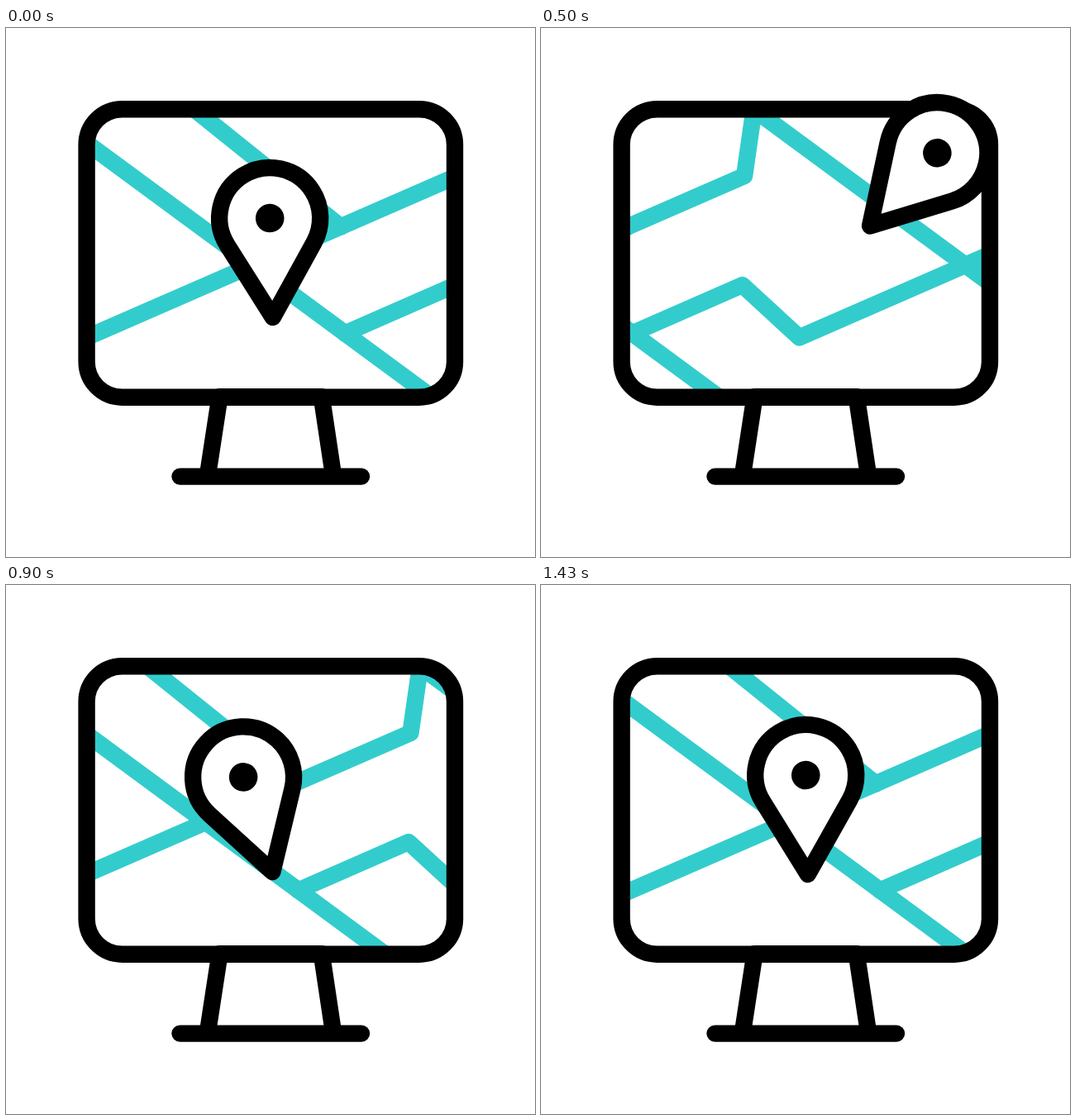
An HTML page with a canvas for the animation above (1670 ms loop, 640 by 640 pixels).

```html
<!DOCTYPE html>
<html lang="en">
<head>
<meta charset="utf-8">
<title>Map on a monitor</title>
<style>
  html, body { margin: 0; width: 100%; height: 100%; overflow: hidden; background: #fff; }
  canvas { display: block; width: 640px; height: 640px; }
</style>
</head>
<body>
<canvas id="stage" width="640" height="640"></canvas>
<script>
const ctx = document.getElementById('stage').getContext('2d');
const LOOP = 1670, STEP = 100 / 3;
const INK = '#000', ROAD = '#33cccc', PAPER = '#fff';
const TILE = 515;
const HOME = [322.8, 350], LEFT = [194, 339.5], RIGHT = [405, 236], BEND = [310, 275.7];

// Smooth 0 to 1 between two steps.
function ease(step, from, to) {
  const u = Math.min(1, Math.max(0, (step - from) / (to - from)));
  return u * u * (3 - 2 * u);
}

const mix = (a, b, u) => a.map((v, i) => v + (b[i] - v) * u);

// One tile of travel, with a slight lead early on.
function mapOffset(step) {
  return TILE * ease(step, 0, 34) + 9 * (ease(step, 0, 7) - ease(step, 10, 18));
}

// The tip darts left, sweeps right, then curves back home.
function pinTip(step) {
  const out = mix(mix(HOME, LEFT, ease(step, 0, 6.8)), RIGHT, ease(step, 6.8, 16));
  const back = ease(step, 16, 28);
  return mix(mix(out, BEND, back), mix(BEND, HOME, back), back);
}

// The head leads the tip, overshoots and settles.
function pinTilt(step) {
  return 1.2 + 25.8 * ease(step, -0.7, 7.7) - 75.5 * ease(step, 7.7, 16.5)
       + 73.6 * ease(step, 16.5, 24.5) - 31 * ease(step, 24.5, 32) + 7.1 * ease(step, 32, 43);
}

function line(...points) {
  ctx.beginPath();
  points.forEach(([x, y]) => ctx.lineTo(x, y));
  ctx.stroke();
}

function screenPath() {
  ctx.beginPath();
  ctx.roundRect(97.6, 98.2, 445.4, 348.5, 43);
}

function drawMap(offset) {
  ctx.save();
  screenPath();
  ctx.clip();
  ctx.strokeStyle = ROAD;
  ctx.lineWidth = 20.4;
  ctx.translate(offset - 3 * TILE, 0);
  for (let tile = 0; tile < 5; tile++) {
    line([410, 369.5], [543.5, 311], [612.5, 374.4], [1061, 178.8], [1072.5, 98.5], [1564, 460.5]);
    line([215, 88], [405, 240.5]);
    ctx.translate(TILE, 0);
  }
  ctx.restore();
}

function drawMonitor() {
  ctx.strokeStyle = INK;
  ctx.lineWidth = 20.4;
  screenPath();
  ctx.stroke();
  line([244, 541], [258.5, 446.3], [381.8, 446.3], [396, 541]);
  line([210.5, 542.6], [430, 542.6]);
}

function drawPin([x, y], degrees) {
  const height = 120, radius = 61;
  const slant = Math.asin(radius / height);
  ctx.save();
  ctx.translate(x, y);
  ctx.rotate(-degrees * Math.PI / 180);
  ctx.beginPath();
  ctx.moveTo(0, 0);
  ctx.arc(0, -height, radius, Math.PI - slant, slant);
  ctx.closePath();
  ctx.fillStyle = PAPER;
  ctx.fill();
  ctx.stroke();
  ctx.beginPath();
  ctx.arc(0, -height, 17.3, 0, 2 * Math.PI);
  ctx.fillStyle = INK;
  ctx.fill();
  ctx.restore();
}

function draw(ms) {
  const step = Math.floor((ms % LOOP + 4) / STEP);
  ctx.fillStyle = PAPER;
  ctx.fillRect(0, 0, 640, 640);
  ctx.lineCap = ctx.lineJoin = 'round';
  drawMap(mapOffset(step));
  drawMonitor();
  drawPin(pinTip(step), pinTilt(step));
}

const start = performance.now();
function tick() {
  draw(performance.now() - start);
  requestAnimationFrame(tick);
}
tick();
</script>
</body>
</html>
```
